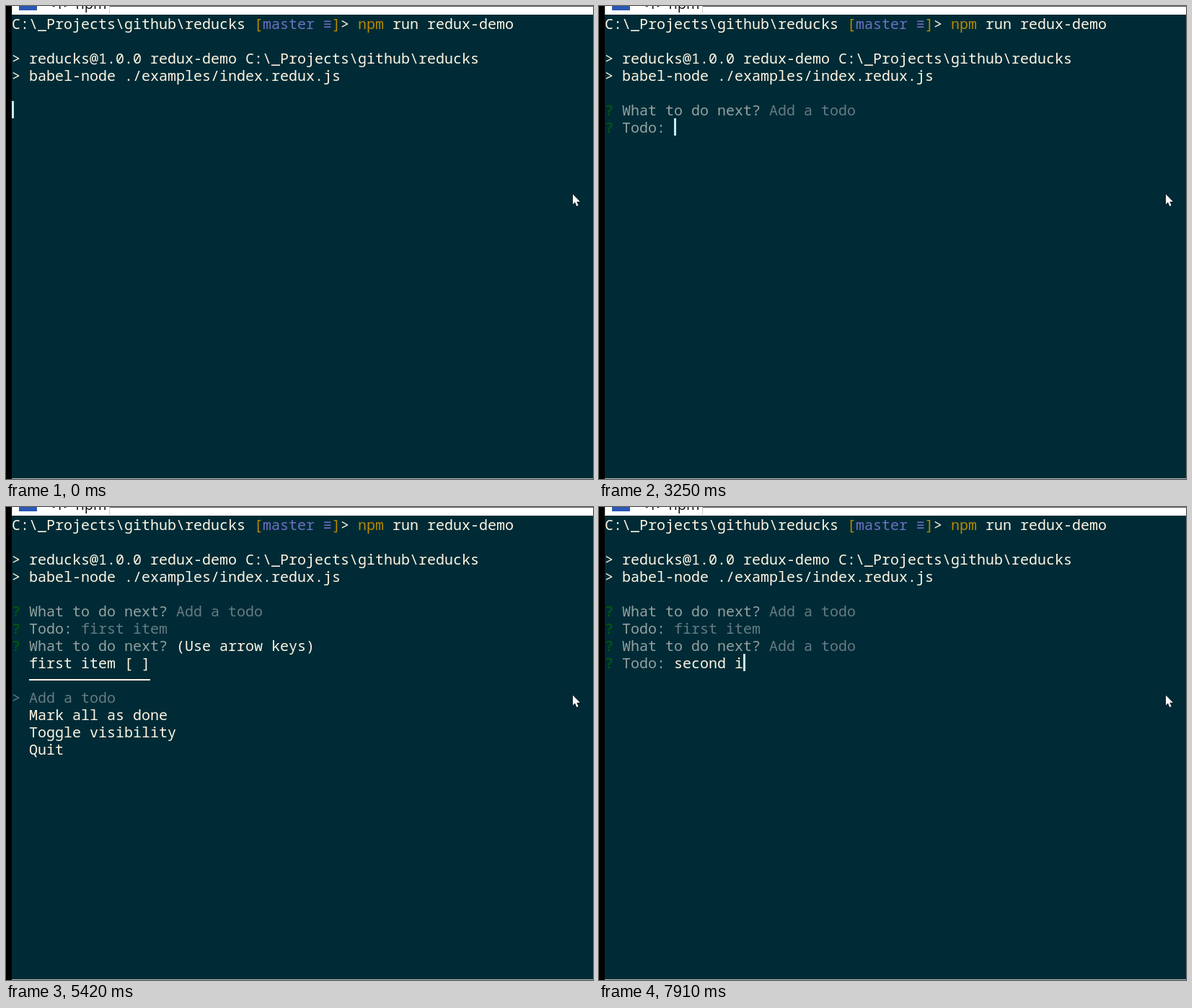
An HTML page with a canvas that plays this animation: 814x657 px, repeating every 8000 ms.

```html
<!DOCTYPE html>
<html lang="en">
<head>
<meta charset="utf-8">
<title>Terminal todo demo</title>
<style>
  html, body { margin: 0; width: 100%; height: 100%; overflow: hidden; background: #002b36; }
  canvas { display: block; }
</style>
</head>
<body>
<canvas id="stage" width="814" height="657"></canvas>
<script>
const ctx = document.getElementById('stage').getContext('2d');
const LOOP = 8000, LEFT = 8, TOP = 12, CELL = 12, LINE = 24;
const WHITE = '#fdf6e3', GREY = '#93a1a1', DIM = '#657b83', GREEN = '#006400',
      YELLOW = '#b58900', VIOLET = '#6c71c4', CURSOR = '#c4ecfa';

// Each entry: [start time, draw function for the area below the command output]
const typed = (text, cursor = true) => () => firstTodo(text, cursor);
const typedSecond = (text, cursor = true) => () => secondTodo(text, cursor);
const steps = [
  [0, () => caret(0, 5)],
  [590, () => {}],
  [1140, () => menu(5, [])],
  [2230, typed('')],
  [2660, typed('', false)],
  [3250, typed('')],
  [3650, typed('f')],
  [3920, typed('fi')],
  [4070, typed('fir')],
  [4190, typed('firs')],
  [4310, typed('first ')],
  [4560, typed('first i')],
  [4860, typed('first it')],
  [4990, typed('first item')],
  [5420, () => { firstDone(); menu(7, ['first item [ ]']); }],
  [6130, typedSecond('')],
  [6660, typedSecond('', false)],
  [6810, typedSecond('s')],
  [7110, typedSecond('se')],
  [7260, typedSecond('sec')],
  [7510, typedSecond('seco')],
  [7630, () => { firstDone(); answer(7); write(0, 8, '?', GREEN); caret(1, 8); }],
  [7780, typedSecond('second')],
  [7910, typedSecond('second i')]
];

function rect(x, y, w, h, color) {
  ctx.fillStyle = color;
  ctx.fillRect(x, y, w, h);
}

function write(col, row, text, color = WHITE) {
  ctx.fillStyle = color;
  ctx.fillText(text, LEFT + col * CELL, TOP + row * LINE + 20);
}

function caret(col, row) {
  rect(LEFT + col * CELL, TOP + row * LINE, 3, LINE, CURSOR);
}

function prompt(row, label) {
  write(0, row, '?', GREEN);
  write(2, row, label, GREY);
}

function answer(row) {
  prompt(row, 'What to do next?');
  write(19, row, 'Add a todo', DIM);
}

function todo(row, text, cursor) {
  prompt(row, 'Todo:');
  write(8, row, text);
  if (cursor) caret(8 + text.length, row);
}

function firstTodo(text, cursor) {
  answer(5);
  todo(6, text, cursor);
}

function firstDone() {
  answer(5);
  prompt(6, 'Todo:');
  write(8, 6, 'first item', DIM);
}

function secondTodo(text, cursor) {
  firstDone();
  answer(7);
  todo(8, text, cursor);
}

function menu(row, items) {
  prompt(row, 'What to do next?');
  write(19, row, '(Use arrow keys)');
  items.forEach(item => write(2, ++row, item));
  row++;
  rect(LEFT + 2 * CELL, TOP + row * LINE + 11, 14 * CELL, 2, WHITE);
  write(0, ++row, '> Add a todo', DIM);
  for (const item of ['Mark all as done', 'Toggle visibility', 'Quit']) write(2, ++row, item);
}

function windowFrame() {
  rect(0, 0, 814, 657, '#002b36');
  rect(0, 0, 8, 657, '#000');
  rect(8, 0, 806, 12, '#fff');
  rect(143, 0, 671, 1, '#555');
  rect(143, 0, 1, 11, '#ccc');
  rect(8, 0, 1, 11, '#ccc');
  rect(18, 0, 25, 6, '#2b57b5');
  ctx.font = '20px "Open Sans", sans-serif';
  ctx.fillStyle = '#111';
  ctx.fillText('<1> npm', 57, 4);
  rect(8, 656, 806, 1, '#b8c0c2');
}

function commandOutput() {
  write(0, 0, 'C:\\_Projects\\github\\reducks');
  write(28, 0, '[', YELLOW);
  write(29, 0, 'master', VIOLET);
  write(36, 0, '≡', VIOLET);
  write(37, 0, ']', YELLOW);
  write(38, 0, '>');
  write(40, 0, 'npm', YELLOW);
  write(44, 0, 'run redux-demo');
  write(0, 2, '> reducks@1.0.0 redux-demo C:\\_Projects\\github\\reducks');
  write(0, 3, '> babel-node ./examples/index.redux.js');
}

const arrow = new Path2D('M786 261.5V275.5L789 272.6L791.3 278L793.7 277L791.4 271.8H796Z');
function pointer() {
  ctx.fillStyle = '#fff';
  ctx.strokeStyle = '#000';
  ctx.lineWidth = 1;
  ctx.stroke(arrow);
  ctx.fill(arrow);
}

function frame() {
  const time = performance.now() % LOOP;
  windowFrame();
  ctx.font = '20px "Noto Sans Mono", "DejaVu Sans Mono", monospace';
  commandOutput();
  steps.findLast(([start]) => start <= time)[1]();
  pointer();
  requestAnimationFrame(frame);
}
frame();
</script>
</body>
</html>
```
